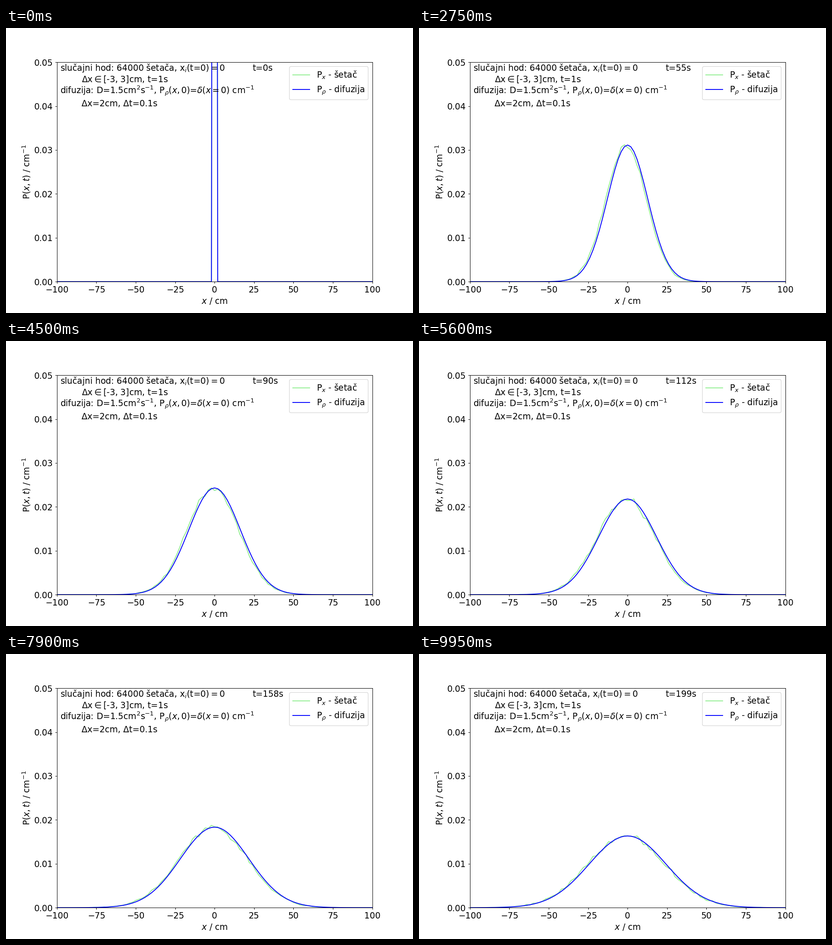
Write a matplotlib script that moves like this. It is 894x626 px and loops after 10 s.

```python
import numpy as np
import matplotlib.pyplot as plt
from matplotlib.animation import FuncAnimation

DPI = 100
SCALE = 0.894  # a 10 inch wide layout drawn 894 px wide
FRAMES = 200
WALKERS = 64000
D, DX, DT = 1.5, 2.0, 0.1
SUBSTEPS = 10

rc = plt.rcParams
rc["font.family"] = "DejaVu Sans"
rc["font.size"] = 15 * SCALE
for key in ("lines.linewidth", "patch.linewidth", "axes.linewidth",
            "axes.labelpad", "xtick.major.size", "xtick.major.width",
            "xtick.major.pad", "ytick.major.size", "ytick.major.width",
            "ytick.major.pad"):
    rc[key] *= SCALE

x = np.arange(-100, 101, DX)


def random_walk():
    """Density of the walkers per bin [x, x + DX) at each second."""
    rng = np.random.default_rng(4)
    pos = np.zeros(WALKERS)
    edges = np.append(x, x[-1] + DX)
    rows = []
    for _ in range(FRAMES):
        rows.append(np.histogram(pos, edges)[0] / (WALKERS * DX))
        pos += rng.uniform(-3, 3, WALKERS)
    return rows


def diffusion():
    """Explicit finite differences from a unit spike at x = 0."""
    p = np.where(x == 0, 1 / DX, 0.0)
    r = D * DT / DX**2
    rows = []
    for _ in range(FRAMES):
        rows.append(p.copy())
        for _ in range(SUBSTEPS):
            p[1:-1] += r * (p[2:] - 2 * p[1:-1] + p[:-2])
    return rows


walk, dens = random_walk(), diffusion()

fig, ax = plt.subplots(figsize=(894 / DPI, 626 / DPI), dpi=DPI)
fig.subplots_adjust(left=0.125, right=0.9, bottom=0.11, top=0.88)
walk_line, = ax.plot(x, walk[0], color="lightgreen", label=r"P$_x$ - šetač")
dens_line, = ax.plot(x, dens[0], color="blue", label=r"P$_\rho$ - difuzija")
ax.set_xlim(-100, 100)
ax.set_ylim(0, 0.05)
ax.set_xticks(range(-100, 101, 25))
ax.set_yticks(np.arange(6) / 100)
ax.set_xlabel(r"$x$ / cm")
ax.set_ylabel(r"P($x,t$) / cm$^{-1}$")
ax.legend(loc="upper right")

LEFT, INDENT = -98, -84.4
ax.text(LEFT, 0.048, r"slučajni hod: 64000 šetača, x$_i$(t=0)$=0$")
ax.text(INDENT, 0.0455, r"Δx$\in$[-3, 3]cm, t=1s")
ax.text(LEFT, 0.0428, r"difuzija: D=1.5cm$^2$s$^{-1}$, "
                      r"P$_\rho(x,0)$=$\delta(x=0)$ cm$^{-1}$")
ax.text(INDENT, 0.04, "Δx=2cm, Δt=0.1s")
clock = ax.text(24, 0.048, "t=0s")


def update(i):
    walk_line.set_ydata(walk[i])
    dens_line.set_ydata(dens[i])
    clock.set_text(f"t={i}s")
    return walk_line, dens_line, clock


anim = FuncAnimation(fig, update, frames=FRAMES, interval=50,
                     repeat=True, repeat_delay=0)
plt.show()
```
